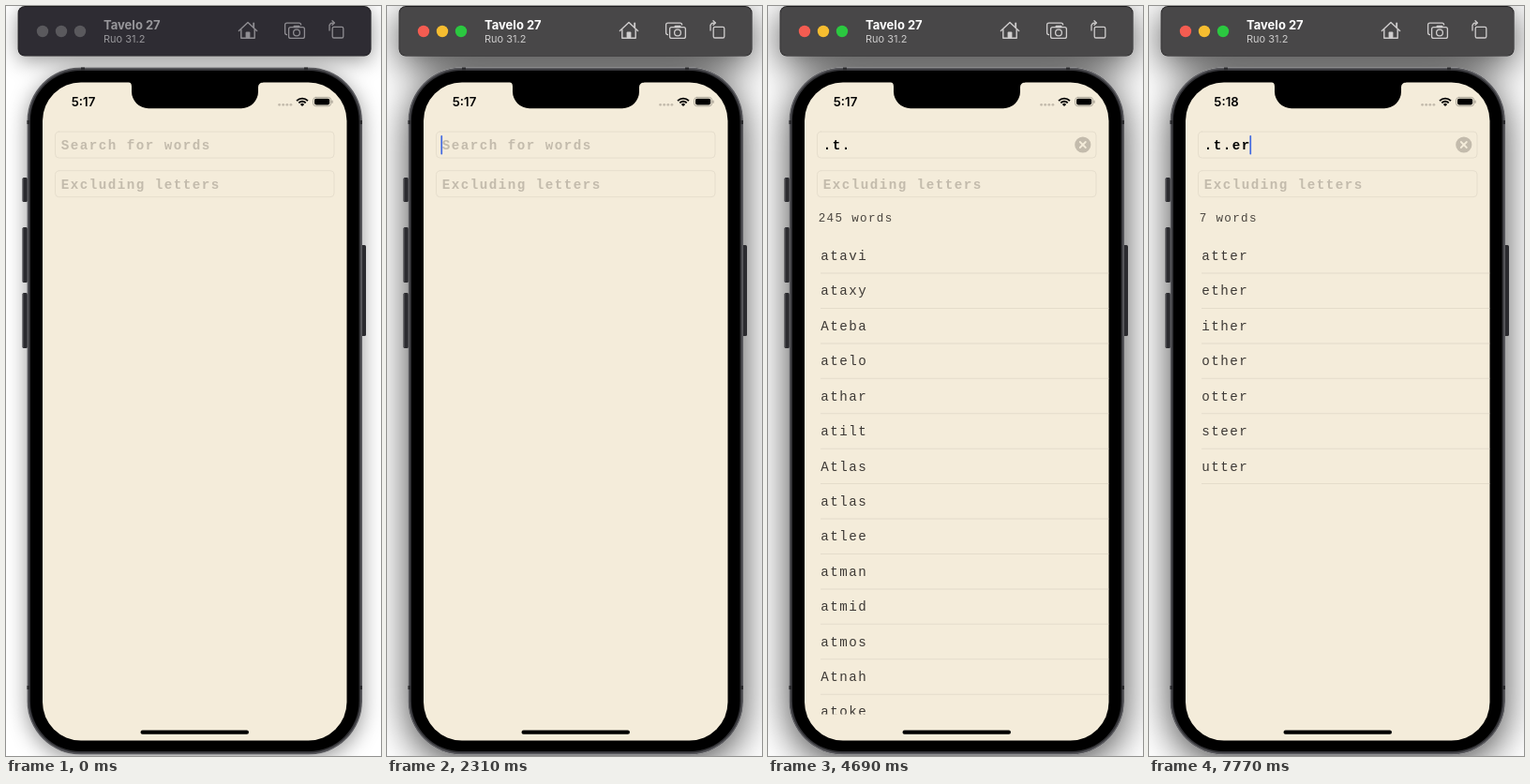
Recreate the animation shown at these times as an HTML page with a canvas. Size 400 by 800 pixels, loop 8000 ms.

```html
<!DOCTYPE html>
<html lang="en">
<head>
<meta charset="utf-8">
<title>Word search</title>
<style>
html, body { margin: 0; width: 100%; height: 100%; overflow: hidden; background: #fff; }
canvas { display: block; width: 400px; height: 800px; }
</style>
</head>
<body>
<canvas id="stage" width="400" height="800"></canvas>
<script>
const ctx = document.getElementById('stage').getContext('2d');
const LOOP = 8000;
const FOCUS = 140, ACTIVATE = 1050, MINUTE = 7490;
const SANS = 'Inter, Roboto, sans-serif';
const MONO = '"Liberation Mono", "Courier New", monospace';
const CREAM = '#f4ecda', MUTED = '#c3bbac', EDGE = '#e6decd';

const QUERY = '.t.er';
const keyTimes = [2450, 3220, 3990, 5040, 5600];
const results = [
  { time: 4130, label: '245 words', words: 'atavi ataxy Ateba atelo athar atilt Atlas atlas atlee atman atmid atmos Atnah atoke' },
  { time: 5880, label: '7 words', words: 'atter ether ither other otter steer utter' }
];

const clamp = v => Math.min(1, Math.max(0, v));

function box(x, y, w, h, r, color) {
  ctx.fillStyle = color;
  ctx.beginPath();
  ctx.roundRect(x, y, w, h, r);
  ctx.fill();
}

function frame(x, y, w, h, r, color, width = 1) {
  ctx.strokeStyle = color;
  ctx.lineWidth = width;
  ctx.beginPath();
  ctx.roundRect(x, y, w, h, r);
  ctx.stroke();
}

function dot(x, y, r, color) {
  ctx.fillStyle = color;
  ctx.beginPath();
  ctx.arc(x, y, r, 0, Math.PI * 2);
  ctx.fill();
}

function line(color, width, ...points) {
  ctx.strokeStyle = color;
  ctx.lineWidth = width;
  ctx.beginPath();
  points.forEach(([x, y]) => ctx.lineTo(x, y));
  ctx.stroke();
}

function text(str, x, y, font, color, align = 'left') {
  ctx.font = font;
  ctx.fillStyle = color;
  ctx.textAlign = align;
  ctx.fillText(str, x, y);
}

// Loosely tracked monospace, like a typewriter face.
function typewriter(str, x, y, weight, size, color) {
  ctx.letterSpacing = size * .105 + 'px';
  text(str, x + size * .05, y, `${weight} ${size}px ${MONO}`, color);
  ctx.letterSpacing = '0px';
}

function drawShadow(active) {
  ctx.save();
  ctx.shadowColor = `rgba(0,0,0,${active ? .72 : .42})`;
  ctx.shadowBlur = active ? 40 : 22;
  ctx.shadowOffsetY = active ? 9 : 5;
  ctx.beginPath();
  ctx.roundRect(13, 0, 376.5, 53, 7);
  ctx.roundRect(22.5, 65.5, 357.5, 733, 57);
  ctx.fill();
  ctx.restore();
}

function drawHome(color) {
  line(color, 1.4, [248.4, 26.5], [258, 17.6], [267.6, 26.5]);
  line(color, 1.4, [250.8, 25], [250.8, 34.2], [265.2, 34.2], [265.2, 25]);
  line(color, 1.8, [264.2, 18.5], [264.2, 22.5]);
  box(255.6, 27.5, 4.8, 6.7, 1, color);
}

function drawCamera(color, back) {
  frame(297.6, 18.2, 17, 12.4, 2, color, 1.3);
  box(300, 20.4, 20, 15, 3, back);
  box(306.5, 20.8, 7, 2.4, 1, color);
  frame(301.6, 22.6, 16.8, 11.8, 2, color, 1.3);
  frame(306.6, 25.1, 6.8, 6.8, 3.4, color, 1.3);
}

function drawRotate(color) {
  frame(348.2, 22.4, 11.6, 11.6, 1.6, color, 1.3);
  line(color, 1.3, [345, 26], [345, 20.5], [346.5, 18.4], [350, 18]);
  line(color, 1.3, [348, 15.8], [350.3, 18], [348, 20.2]);
}

function drawTitleBar(active) {
  const back = active ? '#484748' : '#2e2c33';
  box(12.6, 0, 377, 53.4, 7.4, '#1c1b1d');
  box(13.2, 1, 375.8, 52, 6.6, back);
  ['#f45c51', '#f6bd30', '#2bc840'].forEach((color, i) =>
    dot(39 + 20 * i, 27, 6.2, active ? color : '#5a595d'));
  text('Tavelo 27', 104, 25, '700 13px ' + SANS, active ? '#fff' : '#98979b');
  text('Ruo 31.2', 104, 39, '400 11px ' + SANS, active ? '#cccbcb' : '#97969a');
  const icon = active ? '#cfcdcd' : '#8f8d92';
  drawHome(icon);
  drawCamera(icon, back);
  drawRotate(icon);
}

function drawNotch() {
  const left = 134, right = 269, top = 81.5, bottom = 109.2;
  ctx.fillStyle = '#000';
  ctx.beginPath();
  ctx.moveTo(left - 6, top - 1);
  ctx.arcTo(left, top, left, bottom, 5);
  ctx.arcTo(left, bottom, right, bottom, 18);
  ctx.arcTo(right, bottom, right, top, 18);
  ctx.arcTo(right, top, right + 6, top, 5);
  ctx.lineTo(right + 6, top - 1);
  ctx.fill();
}

function drawButton(x, y, h) {
  box(x, y, 5.5, h, 1.5, '#2b2b2f');
  line('#55555a', .8, [x + .8, y + 1], [x + .8, y + h - 1]);
}

function drawPhone() {
  drawButton(17.5, 183, 26);
  drawButton(17.5, 236, 59);
  drawButton(17.5, 306, 59);
  drawButton(378.5, 255, 97);
  // Nested shells from the metal rim inward.
  ['#5a5a5e', '#343438', '#000'].forEach((color, i) => {
    const inset = 1.7 * i;
    box(22.5 + inset, 65.5 + inset, 357.5 - 2 * inset, 733 - 2 * inset, 57 - inset, color);
  });
  for (const y of [122, 725])
    for (const x of [22.5, 377]) box(x, y, 3, 4, 0, '#2a2a2d');
  for (const x of [80, 318]) box(x, 65.5, 4, 3, 0, '#2a2a2d');
  box(39, 81.5, 324.5, 702, 41, CREAM);
  drawNotch();
  box(143.5, 772.6, 115.5, 4.2, 2.1, '#000');
}

function drawWifi(x, y) {
  const from = -Math.PI * .75, to = -Math.PI * .25;
  ctx.strokeStyle = ctx.fillStyle = '#000';
  ctx.lineWidth = 1.9;
  ctx.lineCap = 'butt';
  for (const r of [5.2, 8.4]) {
    ctx.beginPath();
    ctx.arc(x, y, r, from, to);
    ctx.stroke();
  }
  ctx.beginPath();
  ctx.moveTo(x, y);
  ctx.arc(x, y, 3, from, to);
  ctx.fill();
  ctx.lineCap = 'round';
}

function drawStatus(t) {
  text(t < MINUTE ? '5:17' : '5:18', 82.5, 107, '600 13.2px ' + SANS, '#000', 'center');
  for (let i = 0; i < 4; i++) dot(291.6 + 4.1 * i, 105.3, 1.4, MUTED);
  drawWifi(316, 107);
  frame(327.6, 97.4, 19, 9.4, 3, '#a39d91', .9);
  box(329, 98.8, 16.2, 6.6, 1.8, '#000');
  box(347.4, 100.4, 1.2, 3.4, .6, '#a39d91');
}

// The caret blinks every 1050 ms and restarts lit after each key.
function caretAlpha(t, pressed) {
  const since = t - (pressed ? keyTimes[pressed - 1] : FOCUS);
  const phase = (since + 1050) % 1050;
  return phase < 800 ? clamp((700 - phase) / 150) : clamp((phase - 950) / 100);
}

function drawFields(t) {
  const pressed = keyTimes.filter(time => time <= t).length;
  const query = QUERY.slice(0, pressed);
  frame(52.5, 134, 297.5, 28, 4, EDGE);
  frame(52.5, 175.7, 297.5, 28, 4, EDGE);
  typewriter(query || 'Search for words', 58, 153, 700, 14.2, query ? '#000' : MUTED);
  typewriter('Excluding letters', 58, 194.7, 700, 14.2, MUTED);
  if (query) {
    dot(335.8, 148, 8.6, MUTED);
    for (const d of [-3, 3]) line(CREAM, 1.8, [335.8 - d, 145], [335.8 + d, 151]);
  }
  ctx.globalAlpha = caretAlpha(t, pressed);
  box(57.4 + 10 * pressed, 138, 1.7, 20.5, .8, '#4169e1');
  ctx.globalAlpha = 1;
}

function drawResults(t) {
  const list = results.filter(r => r.time <= t).pop();
  if (!list) return;
  typewriter(list.label, 53, 230, 400, 12.6, '#4a453f');
  ctx.save();
  ctx.beginPath();
  ctx.rect(39, 240, 324.5, 515.5);
  ctx.clip();
  list.words.split(' ').forEach((word, i) => {
    const y = 37.42 * i;
    typewriter(word, 55.5, 271 + y, 400, 14.2, '#3d3935');
    box(56, 284.6 + y, 307.5, 1, 0, '#e4dccb');
  });
  ctx.restore();
}

function draw(t) {
  const active = t >= ACTIVATE;
  ctx.fillStyle = '#fff';
  ctx.fillRect(0, 0, 400, 800);
  ctx.lineCap = ctx.lineJoin = 'round';
  drawShadow(active);
  drawTitleBar(active);
  drawPhone();
  drawStatus(t);
  drawFields(t);
  drawResults(t);
}

const start = performance.now();
function tick() {
  draw((performance.now() - start) % LOOP);
  requestAnimationFrame(tick);
}
tick();
</script>
</body>
</html>
```
